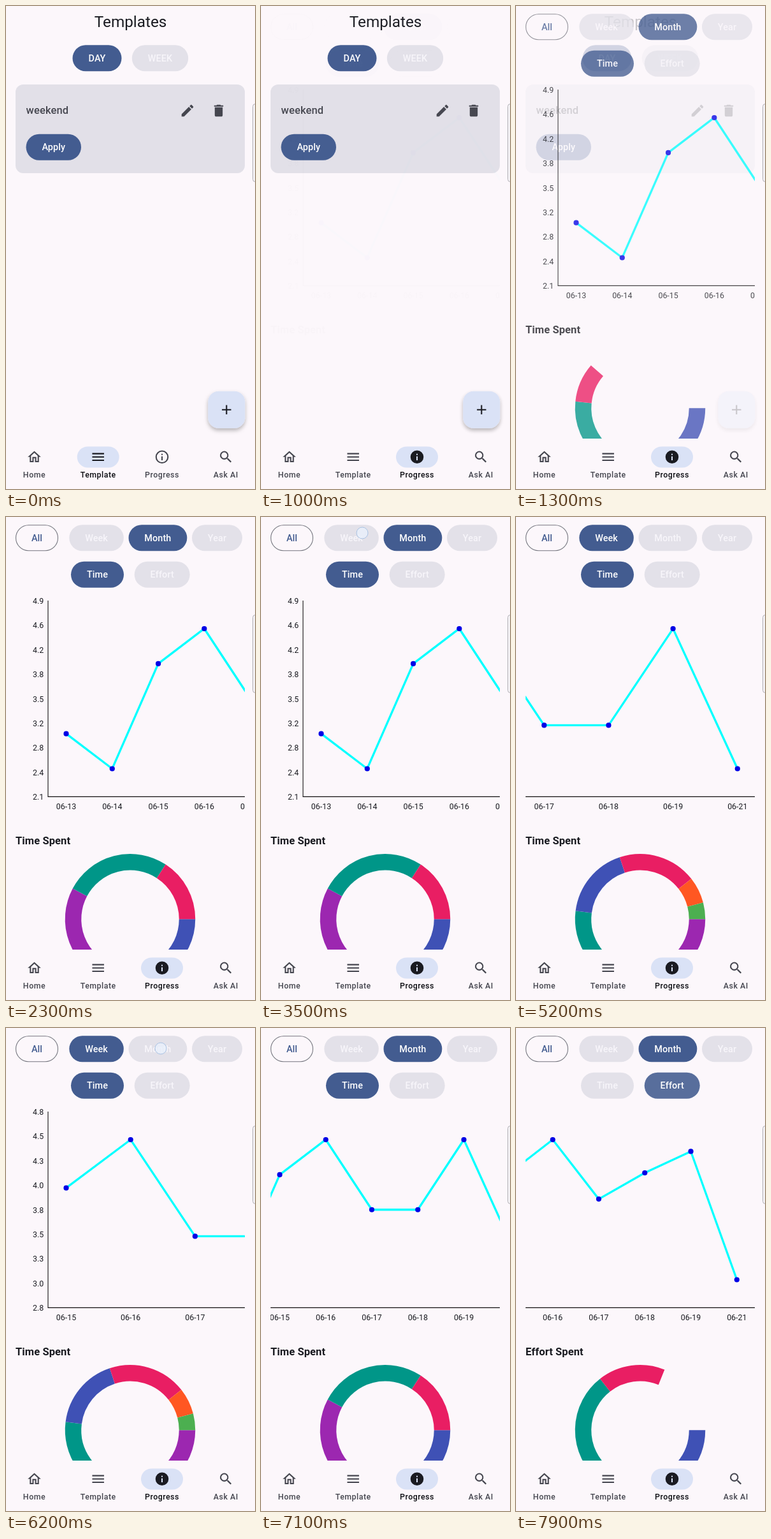
Write an HTML page that moves like this. It is 391 px wide and 757 px high and loops after 8000 ms.

```html
<!DOCTYPE html>
<html lang="en">
<head>
<meta charset="utf-8">
<title>Templates and progress</title>
<style>
  html, body { margin: 0; width: 100%; height: 100%; overflow: hidden; background: #fcf7fb; }
  svg { display: block; width: 100%; height: 100%; }
  text { font-family: Roboto, sans-serif; white-space: pre; }
</style>
</head>
<body>
<svg id="stage" viewBox="0 0 391 757">
  <defs>
    <clipPath id="plot"><rect x="15" y="118" width="360" height="350"/></clipPath>
    <filter id="lift" x="-30%" y="-30%" width="160%" height="170%">
      <feDropShadow dx="0" dy="3.5" stdDeviation="3" flood-color="#000" flood-opacity=".28"/>
    </filter>
  </defs>
  <g id="screen"></g>
</svg>
<script>
const LOOP = 8000, STEP = 100;
const BG = '#fcf7fb', PRIMARY = '#435c90', MUTED = '#e3e1e9', INK = '#1a1b21', GREY = '#45464f', TINT = '#dae2f6';
const INDIGO = '#3f51b5', PURPLE = '#9c27b0', TEAL = '#009688', PINK = '#e91e63', ORANGE = '#ff5722', GREEN = '#4caf50';
const MAX_SCROLL = 253.7;

const ICONS = {
  home: 'M12 5.69l5 4.5V18h-2v-6H9v6H7v-7.81l5-4.5M12 3L2 12h3v8h6v-6h2v6h6v-8h3L12 3z',
  menu: 'M3 18h18v-2H3v2zm0-5h18v-2H3v2zm0-7v2h18V6H3z',
  info: 'M11 7h2v2h-2zm0 4h2v6h-2zm1-9a10 10 0 100 20 10 10 0 000-20zm0 18a8 8 0 110-16 8 8 0 010 16z',
  infoOn: 'M12 2a10 10 0 100 20 10 10 0 000-20zm1 15h-2v-6h2v6zm0-8h-2V7h2v2z',
  search: 'M15.5 14h-.79l-.28-.27A6.5 6.5 0 109.5 16c1.61 0 3.09-.59 4.23-1.57l.27.28v.79l5 4.99L20.49 19l-4.99-5zm-6 0a4.5 4.5 0 110-9 4.5 4.5 0 010 9z',
  edit: 'M3 17.25V21h3.75L17.81 9.94l-3.75-3.75L3 17.25zM20.71 7.04c.39-.39.39-1.02 0-1.41l-2.34-2.34c-.39-.39-1.02-.39-1.41 0l-1.83 1.83 3.75 3.75 1.83-1.83z',
  trash: 'M6 19c0 1.1.9 2 2 2h8c1.1 0 2-.9 2-2V7H6v12zM19 4h-3.5l-1-1h-5l-1 1H5v2h14V4z',
  add: 'M19 13h-6v6h-2v-6H5v-2h6V5h2v6h6v2z'
};

const DAYS = [13, 14, 15, 16, 17, 18, 19, 21];
const MONTH_TICKS = ['4.9', '4.6', '4.2', '3.8', '3.5', '3.2', '2.8', '2.4', '2.1'];

// Slices hold [colour, end angle] clockwise from three o'clock.
const VIEWS = [
  { from: 0, grow: 996, span: 'Month', kind: 'Time', ticks: MONTH_TICKS, days: DAYS,
    values: [3, 2.5, 4, 4.5, 3.5, 3.5, 4.5, 3.05],
    slices: [[INDIGO, 110], [PURPLE, 208], [TEAL, 303], [PINK, 360]] },
  { from: 3600, grow: 3560, span: 'Week', kind: 'Time', days: DAYS.slice(2),
    ticks: ['4.8', '4.5', '4.3', '4.0', '3.8', '3.5', '3.3', '3.0', '2.8'],
    values: [4, 4.5, 3.5, 3.5, 4.5, 3.05],
    slices: [[PURPLE, 100], [TEAL, 187.3], [INDIGO, 251.7], [PINK, 321.8], [ORANGE, 345.3], [GREEN, 360]] },
  { from: 7500, grow: 7497, span: 'Month', kind: 'Effort', ticks: MONTH_TICKS, days: DAYS,
    values: [.43, .25, .745, 1, .576, .763, .916, 0],
    slices: [[INDIGO, 100], [PURPLE, 160], [TEAL, 286], [PINK, 360]] }
];
VIEWS.splice(2, 0, { ...VIEWS[0], from: 6300, grow: 6260 });

const TAPS = [[900, 245, 707], [3500, 159, 25, 'Week'], [6200, 243, 32, 'Month'], [7400, 245, 91, 'Effort']];
const DRAGS = [[4500, 320, -1], [5500, 80, 1], [6800, 330, -1]];

const clamp = v => Math.max(0, Math.min(1, v));
const phase = (t, start, length) => clamp((t - start) / length);
const slowOut = u => 1 - (1 - u) ** 2;

// cubic-bezier(.4, 0, .2, 1)
function standard(u) {
  let lo = 0, hi = 1;
  for (let i = 0; i < 24; i++) {
    const s = (lo + hi) / 2, r = 1 - s;
    if (1.2 * r * r * s + .6 * r * s * s + s ** 3 < u) lo = s; else hi = s;
  }
  return 3 * (1 - lo) * lo * lo + lo ** 3;
}

const rect = (x, y, w, h, r, fill, more = '') =>
  `<rect x="${x}" y="${y}" width="${w}" height="${h}" rx="${r}" fill="${fill}" ${more}/>`;
const text = (s, x, y, size, fill, weight = 400, anchor = 'middle', gap = 0) =>
  `<text x="${x}" y="${y}" font-size="${size}" fill="${fill}" font-weight="${weight}" text-anchor="${anchor}" letter-spacing="${gap}">${s}</text>`;
const icon = (name, cx, cy, fill) =>
  `<path d="${ICONS[name]}" fill="${fill}" transform="translate(${cx - 12.36} ${cy - 12.36}) scale(1.03)"/>`;
const layer = (body, opacity) => opacity > 0 ? `<g opacity="${opacity}">${body}</g>` : '';

function pill(label, x, y, w, on, ripple = 0) {
  const h = 41;
  return rect(x, y, w, h, h / 2, on ? PRIMARY : MUTED)
    + (ripple ? rect(x, y, w, h, h / 2, '#fff', `opacity="${ripple}"`) : '')
    + text(label, x + w / 2, y + 25.6, 14.4, on ? '#fff' : '#f7f5fa', 500, 'middle', .1);
}

const templates = text('Templates', 195.5, 33, 24.3, INK)
  + pill('DAY', 104.5, 61.3, 77, true) + pill('WEEK', 197.8, 61.3, 88.4, false)
  + rect(15, 123, 360, 139, 12, '#e2e0e8')
  + text('weekend', 31.5, 169, 16.5, GREY, 500, 'start', .15)
  + icon('edit', 285, 164, GREY) + icon('trash', 334, 164, GREY)
  + pill('Apply', 31.5, 200.7, 86.5, true)
  + rect(317.3, 603.7, 58, 58, 16.5, TINT, 'filter="url(#lift)"')
  + icon('add', 346.3, 632.8, INK);

function lineChart(view, scroll) {
  const { values, days, ticks } = view;
  const top = Math.max(...values), range = top - Math.min(...values);
  const gap = 506 / (values.length - 1);
  const pts = values.map((v, i) => [94.5 + i * gap, 175 + (top - v) / range * 219.5]);
  return `<g clip-path="url(#plot)"><g transform="translate(${-scroll} 0)">`
    + '<path d="M66 131V438.4H629" fill="none" stroke="#111" stroke-width="1.1"/>'
    + ticks.map((s, i) => text(s, 59.3, 136 + i * 38.4, 12.4, INK, 400, 'end')).join('')
    + days.map((d, i) => text('06-' + d, pts[i][0], 458, 12.4, INK)).join('')
    + `<polyline points="${pts.join(' ')}" fill="none" stroke="#0ff" stroke-width="3.3"/>`
    + pts.map(([x, y]) => `<circle cx="${x}" cy="${y}" r="4.1" fill="#0000e6"/>`).join('')
    + '</g></g>';
}

function donut(slices, grown) {
  const r = 89.5, at = deg => {
    const a = deg * grown * Math.PI / 180;
    return `${195 + r * Math.cos(a)} ${630.3 + r * Math.sin(a)}`;
  };
  let start = 0;
  return slices.map(([colour, end]) => {
    const d = `M${at(start)}A${r} ${r} 0 ${(end - start) * grown > 180 ? 1 : 0} 1 ${at(end - .001)}`;
    start = end;
    return `<path d="${d}" fill="none" stroke="${colour}" stroke-width="25.5"/>`;
  }).join('');
}

function progressPage(t, view, scroll) {
  const ripple = name => {
    const tap = TAPS.find(p => p[3] === name && t > p[0]);
    return tap ? .11 * clamp((800 - (t - tap[0])) / 300) : 0;
  };
  const choice = (name, x, y, w) => pill(name, x, y, w, name === view.span || name === view.kind, ripple(name));
  const grown = standard(phase(t, view.grow, 760));
  return rect(15.5, 12.7, 66, 40, 20, 'none', 'stroke="#75767f" stroke-width="1.1"')
    + text('All', 48.5, 38, 14.4, PRIMARY, 500, 'middle', .1)
    + choice('Week', 99.3, 12.2, 85.5) + choice('Month', 192.5, 12.2, 91.8) + choice('Year', 292, 12.2, 79)
    + choice('Time', 102, 69.8, 83) + choice('Effort', 201.7, 69.8, 87)
    + lineChart(view, scroll)
    + text(view.kind + ' Spent', 15, 513, 16.5, INK, 700, 'start', .1)
    + (grown > 0 ? donut(view.slices, grown) : '');
}

function navBar(active) {
  const items = [['Home', 'home', 44.5], ['Template', 'menu', 144.7], ['Progress', 'info', 245], ['Ask AI', 'search', 345.3]];
  return rect(0, 678, 391, 79, 0, BG) + items.map(([label, glyph, x], i) => {
    const on = i === active, fill = on ? INK : GREY;
    return (on ? rect(x - 33, 690.4, 66, 33, 16.5, TINT) : '')
      + icon(on && glyph === 'info' ? 'infoOn' : glyph, x, 706.8, fill)
      + text(label, x, 739.3, 12.4, on ? '#0c0d12' : fill, 500, 'middle', .5);
  }).join('');
}

function touch(t) {
  const dot = (x, y) => `<circle cx="${x}" cy="${y}" r="9" fill="#e8f0fb" fill-opacity=".8" stroke="#a8c1e2" stroke-width="1"/>`;
  const tap = TAPS.find(p => t >= p[0] && t < p[0] + STEP);
  if (tap) return dot(tap[1], tap[2]);
  const drag = DRAGS.find(p => t >= p[0] && t < p[0] + 3 * STEP);
  return drag ? dot(drag[1] + drag[2] * (t - drag[0] + 50) * .7, 300) : '';
}

function scrollAt(t) {
  const slide = (start, length) => slowOut(phase(t, start, length));
  return MAX_SCROLL * (t < 6200 ? slide(4450, 800) - slide(5450, 550) : slide(6750, 600));
}

const screen = document.getElementById('screen');

function draw(t) {
  const view = VIEWS.filter(v => t >= v.from).pop();
  const fade = standard(phase(t, 950, 700));
  screen.innerHTML = rect(0, 0, 391, 757, 0, BG)
    + layer(templates, 1 - fade)
    + layer(progressPage(t, view, scrollAt(t)), fade)
    + navBar(t < 1000 ? 1 : 2)
    + rect(387.5, 153.5, 12, 122, 4, '#f4f2f5', 'stroke="#b3b1b7"')
    + touch(t);
}

let shown = -1;
const origin = performance.now();
function tick() {
  const t = Math.floor((performance.now() - origin) % LOOP / STEP) * STEP;
  if (t !== shown) draw(shown = t);
  requestAnimationFrame(tick);
}
tick();
</script>
</body>
</html>
```
